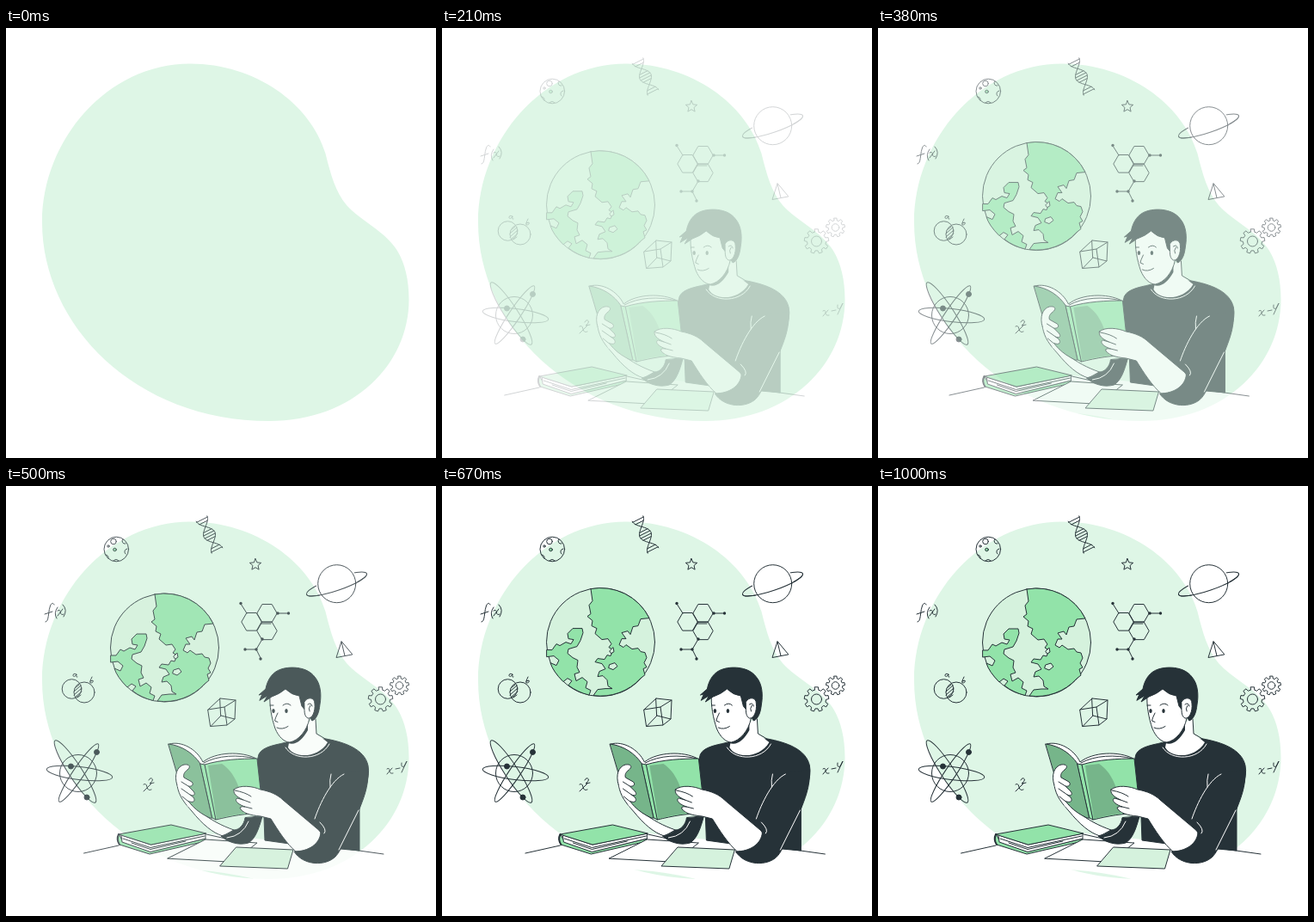
Write an HTML page that moves like this. It is 500x500 px and loops after 1040 ms.

```html
<!DOCTYPE html>
<html lang="en">
<head>
<meta charset="utf-8">
<title>Reading student</title>
<style>
html, body { margin: 0; width: 100%; height: 100%; overflow: hidden; background: #fff; }
svg { display: block; width: 100vw; height: 100vh; }
.line { fill: none; stroke: #263238; stroke-width: 1; stroke-linecap: round; stroke-linejoin: round; }
.line .ink, .ink { fill: #263238; }
.line .white { fill: #fff; }
.line .green { fill: #92e3a9; }
.line .pale { fill: #d5f2dd; }
.line .deep { fill: #76b58a; }
.line .light { stroke: #fff; }
.line .bare { stroke: none; }
</style>
</head>
<body>
<svg viewBox="0 0 500 500">
  <path fill="#def6e6" d="M42 226C42 130 118 41.500 214 41.500C290 41.500 354 88 371.500 146C378 172 383 190 396 206C413 225 441 236 455 259C464 274 468.500 293 468.500 316C468.500 390 405 457 306 457C150 457 42 345 42 226Z"/>

  <g id="icons" class="line">
    <!-- moon -->
    <circle cx="128.300" cy="73.500" r="14.300"/>
    <circle cx="125" cy="64.500" r="3.300"/><circle cx="126.500" cy="74" r="1.800" class="green"/>
    <circle cx="119" cy="70" r="1.200"/><path d="M136 62a3 3 0 0 0 3 5M141 73a3.500 3.500 0 0 0-2 6M125 87a3.500 3.500 0 0 1 6 0M116 80a3 3 0 0 1 3 4"/>
    <!-- f(x) -->
    <path d="M46 158C50 158 49 147 51 141C52 136 55 135 56 138M45 149L54 146M60 141Q55 148 59 154M60 145Q63 143 63.500 147T67 149M66 143L60 151M66 138Q72 144 67 152"/>
    <!-- overlapping sets -->
    <circle cx="76.500" cy="236" r="11.300"/><circle cx="91" cy="240" r="12"/>
    <path d="M80 235l5-4M79 239l8-7M79 243l9-8M81 245l7-6M83 246l4-3M82 219Q78 217 78 220.500Q79 223 82 219Q81 223 83 222M100 222Q97 228 98 229Q102 229 101 226L98 227"/>
    <!-- atom -->
    <circle cx="84" cy="334" r="21.500"/>
    <ellipse rx="38.500" ry="7.500" transform="translate(85.500 334) rotate(7)"/>
    <ellipse rx="43" ry="7.800" transform="translate(80.500 332) rotate(57)"/>
    <ellipse rx="40.500" ry="6.500" transform="translate(84.500 333.500) rotate(124)"/>
    <g class="ink"><circle cx="105.500" cy="309.500" r="3"/><circle cx="75.500" cy="326" r="3"/><circle cx="94" cy="362" r="3"/></g>
    <!-- x squared, x - y -->
    <path d="M160 347Q163 345 164 350T169 353M169 346L160 355M166 342Q168 338 170.500 341Q171 343 167 346L172 345"/>
    <path d="M443 329Q446 327 446 331T450 334M449 328L443 335M453 329L458 328M460 322Q459 328 463 326L466 320L460 333"/>
    <!-- cube -->
    <path d="M235 260L254 257L257 278L238 279.500ZM249 247L267 249L266 271L250 267ZM235 260L249 247M254 257L267 249M257 278L266 271M238 279.500L250 267"/>
    <!-- molecule bonds -->
    <path d="M280 148L273 137M315 148H328M298 178L291 190H278M291 190L296 200M297 160H308"/>
    <g class="ink bare"><circle cx="273" cy="136.500" r="1.700"/><circle cx="328.500" cy="148" r="1.700"/><circle cx="316" cy="148" r="1.700"/><circle cx="298" cy="178" r="1.700"/><circle cx="291" cy="190" r="1.700"/><circle cx="278" cy="190" r="1.700"/><circle cx="296" cy="201" r="1.700"/></g>
    <!-- ringed planet, with a small gap behind it -->
    <ellipse cx="384.500" cy="114" rx="37" ry="7.500" transform="rotate(-19 384.500 114)"/>
    <circle cx="384.700" cy="113.700" r="24" class="white bare"/>
    <circle cx="384.700" cy="113.700" r="22"/>
    <path d="M-37 0A37 7.500 0 0 0 37 0" transform="translate(384.500 114) rotate(-19)"/>
    <!-- pyramid -->
    <path d="M390 181L384 199.500L402.500 196ZM390 181L394 197.500"/>
    <!-- gear holes -->
    <circle cx="435.500" cy="248" r="6"/><circle cx="457.500" cy="232" r="4.300"/>
  </g>

  <g id="globe" class="line">
    <circle cx="184.500" cy="182" r="63" class="pale"/>
    <path class="green" d="M173 120L175 134L171 139L173 149L169 152L175 157L174 163L180 166L178 172L186 179L193 178L197 184L194 188L199 191L196 198L192 197L189 202L181 201L178 205L186 207L190 213L183 216L181 222L187 221L192 226L193 233L198 236L190 236L181 237L176 244A63 63 0 0 0 231 224L236 220L234 213L238 211L235 206L238 200L236 194L231 193L228 189L221 190L214 185L211 188L206 185L209 178L214 178L209 171L216 169L219 173L222 164L228 163L231 155L241 154A63 63 0 0 0 173 120Z"/>
    <path class="pale" d="M195 208L201 206L204 210L199 214L194 212Z"/>
    <path class="pale" d="M195 192L199 188L200 193L197 195Z"/>
    <path class="green" d="M122 191L128 191L133 184L137 186L144 182L150 184L153 179L147 178L146 172L152 166L163 166L164 171L161 180L157 187L147 190L146 195L152 200L158 203L157 211L160 217L154 219L156 227L163 223L169 228L167 235L173 238L171 243.500Q157 240 147 232L151 227L146 224L141 228Q129 216 126 206L133 209L136 203L130 198L122 199Z"/>
  </g>

  <g id="reader" class="line">
    <path class="white bare" d="M97 427L137 417L239 404L307 411L445 428V462H300L293 456.500Q262 449 228 446.500L97 440Z"/>
    <path d="M96.500 427L137 418M239 405L275 413M395 421L445 428"/>

    <!-- closed book -->
    <path class="green" d="M137 405Q134 411 138 417L173 428L238 413V410L174 425L142 413Z"/>
    <path class="white" d="M140 406L141 414L174 425.500L238 410V404L175 417Z"/>
    <path d="M142 410L174 420.500L237 407M152 415L174 422.500L215 413"/>
    <path class="green" d="M137 405L198 394L239 404L175 417Z"/>
    <path d="M137 405Q134 411 138 417" stroke-width="2"/>

    <!-- papers -->
    <path class="white" d="M194 433L238 411L298 415L270 437Z"/>
    <path class="pale" d="M274 420L340 423L333.500 445L255 442Z"/>

    <!-- torso -->
    <path class="ink" d="M336 297C322 301 305 302 300 312L298 320L306 385L307 412L350 418L417 424V375C421 355 430 340 427 325C423 306 400 298 378 294Z"/>

    <!-- far arm -->
    <path class="white" d="M205 348C207 361 214 369 222 378C235 394 246 403 258 407L271 400C257 395 245 389 231 378L224 368Z"/>
    <path class="ink" d="M284 386C283 394 277 400 271 400Q264 406 256 407C265 415 277 418 288 415C296 410 300 399 304 384Z"/>
    <path class="light" d="M263 409Q281 407 288 390"/>

    <!-- open book -->
    <path class="white" d="M196 300C210 296 228 306 235 321C250 309 280 308 297 317L285 330H225Z"/>
    <path d="M236 322C252 313 276 312 296 317"/>
    <path class="deep" d="M195 300C211 302 224 311 232 323L246 386L243 386C228 379 217 369 210 352Z"/>
    <path class="green" d="M237 324C256 318 280 317 298 317L305 381C286 380 267 384 250 388Z"/>
    <path class="deep bare" d="M241 325L257 323C271 332 281 352 282 381Q265 383 251 387Z"/>
    <path class="green" d="M232 323L237 324L250 388L246 386Z"/>

    <!-- far hand -->
    <path class="white bare" d="M205 348C201 336 205 326 213 324C220 323 221 327 217 330C213 333 212 336 213 339L222 344C225 347 222 350 218 349L224 355C227 359 224 361 220 359L224 362C227 367 223 369 217 366L218 374Z"/>
    <path d="M205 348C201 336 205 326 213 324C220 323 221 327 217 330C213 333 212 336 213 339L222 344C225 347 222 350 218 349L210 344M218 349L224 355C227 359 224 361 220 359L210 352M220 359L224 362C227 367 223 369 217 366L211 361"/>

    <!-- neck and head -->
    <path class="white bare" d="M336 294L334 304C341 317 369 317 380 298L367 288L366 268Z"/>
    <path d="M366 271L367 288L379 295"/>
    <path class="light" d="M331 304C341 320 372 319 382 300"/>
    <path class="ink bare" d="M334 297C344 297 352 290 357 276V284C351 295 343 302 334 299Z"/>
    <path class="white" d="M313 241C312 256 315 270 319 282C323 292 330 298 336 298C346 296 356 285 359 270L358 234L325 230Z"/>
    <path class="ink" d="M301 249L304 242L300 243L308 236C310 225 316 216 326 213C339 209 357 211 365 222C372 230 373 243 371 254C370 264 367 271 362 273L355 262L350 256L347 244Q338 243 331 236Q324 242 315 245L306 251L310 244Z"/>
    <path class="white" d="M353 251C356 245 365 245 365 253C366 262 362 271 357 270Q353 268 353 261Z"/>
    <path d="M357 254Q361 251 362 256M360 255Q357 259 359 262M313 255L317 255M328 255Q333 251 337 255M322 264Q319 270 318.500 273L322 274.500M321 281Q327 284 334 279.500"/>
    <g class="ink bare"><ellipse cx="317" cy="261.500" rx="1.700" ry="2.500"/><ellipse cx="332" cy="261.500" rx="1.700" ry="2.500"/></g>

    <!-- near arm -->
    <path class="white" d="M271 353C278 347 293 349 302 353C313 355 322 359 328 365L372 402C374 414 361 426 343 425C333 417 322 400 314 387L302 384C290 383 280 380 278 374Q280 372 284 373C275 370 271 365 275 363L282 365C273 361 270 357 271 353Z"/>
    <path d="M272 354Q284 356 291 361M282 365L290 368M284 373L292 375"/>
    <path class="ink" d="M427 330C428 350 421 365 416 378C406 397 397 423 389 431C378 442 352 442 341 425C358 425 371 416 372 403L363 390C371 365 385 340 400 333Z"/>
    <path class="light" d="M399 335C384 342 371 369 365 387M383 350Q382 342 384 335M416 377L393 423M371 391Q380 400 376 404"/>
  </g>
</svg>
<script>
const LOOP = 1040, STEP = 1000 / 24, LEAD = 30, SHIFT = 30;
const icons = document.getElementById('icons');
const globe = document.getElementById('globe');
const reader = document.getElementById('reader');

function addPath(d) {
  const path = document.createElementNS('http://www.w3.org/2000/svg', 'path');
  path.setAttribute('d', d);
  icons.append(path);
}

// Closed shape from polar points; angles are measured from the top.
function addPolar(cx, cy, count, radius, angle) {
  const points = Array.from({ length: count }, (_, i) => {
    const a = angle(i), r = radius(i);
    return [cx + r * Math.sin(a), cy - r * Math.cos(a)];
  });
  addPath('M' + points.join('L') + 'Z');
}

function addGear(cx, cy, outer, inner, teeth) {
  const offsets = [-.2, .2, .3, .7];
  addPolar(cx, cy, teeth * 4, i => i % 4 < 2 ? outer : inner,
    i => (Math.floor(i / 4) + offsets[i % 4]) * 2 * Math.PI / teeth);
}

function addHelix() {
  const at = (s, side) => {
    const w = 7 * side * Math.cos(2 * Math.PI * s);
    return [227.5 + 18 * s - w * .9, 38 + 37 * s + w * .45];
  };
  for (const side of [1, -1]) {
    addPath('M' + Array.from({ length: 33 }, (_, i) => at(i / 32, side)).join('L'));
  }
  for (const s of [.03, .12, .38, .46, .54, .62, .88, .97]) {
    addPath('M' + at(s, 1) + 'L' + at(s, -1));
  }
}

addGear(435.5, 248, 14.3, 11, 9);
addGear(457.5, 232, 11, 8.3, 9);
addPolar(290, 91.5, 10, i => i % 2 ? 3.2 : 7, i => i * Math.PI / 5);
for (const [x, y] of [[285.5, 158], [303.5, 148], [303.5, 168.5]]) {
  addPolar(x, y, 6, () => 11.7, i => (i + .5) * Math.PI / 3);
}
addHelix();

const bezier = (p, a, b) => 3 * (1 - p) ** 2 * p * a + 3 * (1 - p) * p * p * b + p ** 3;

// Overshooting ease: cubic-bezier(.36, -.01, .5, 1.38)
function ease(x) {
  let low = 0, high = 1;
  for (let i = 0; i < 24; i++) {
    const mid = (low + high) / 2;
    if (bezier(mid, .36, .5) < x) low = mid; else high = mid;
  }
  return bezier(low, -.01, 1.38);
}

function draw() {
  const time = performance.now() % LOOP;
  const step = Math.floor((time + 4) / STEP);
  const progress = step < 3 ? 0 : ease(Math.min(1, (step * STEP + LEAD) / 1000));
  const offset = SHIFT * (1 - progress);
  for (const part of [icons, globe, reader]) part.setAttribute('opacity', Math.min(1, progress));
  globe.setAttribute('transform', `translate(0 ${offset})`);
  reader.setAttribute('transform', `translate(${-offset} 0)`);
  requestAnimationFrame(draw);
}
draw();
</script>
</body>
</html>
```
